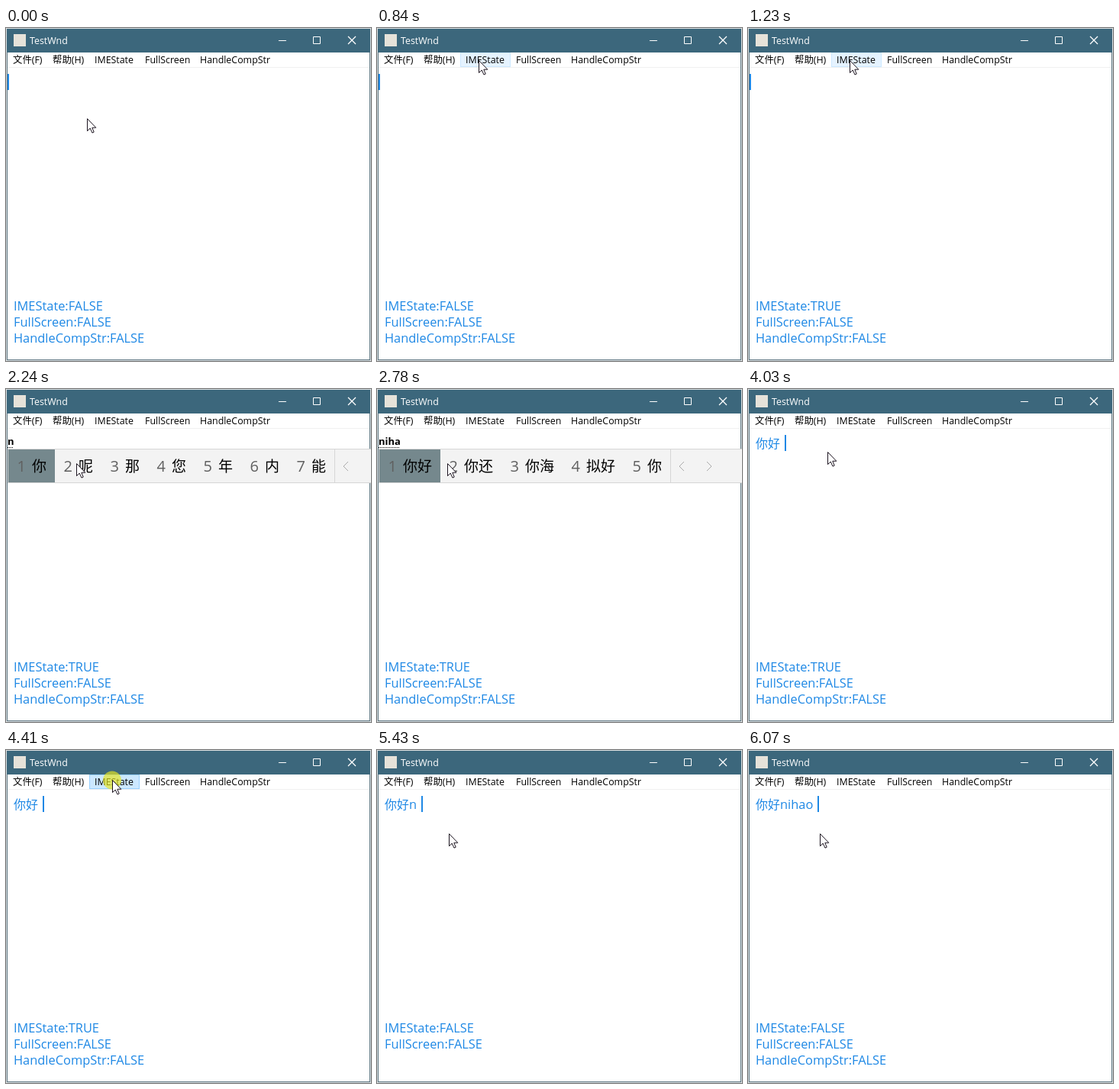
Animation, 478 px wide and 435 px high, one loop 8.01 s. Source, as an HTML page:

```html
<!DOCTYPE html>
<html lang="zh">
<head>
<meta charset="utf-8">
<title>TestWnd</title>
<style>
html, body { margin: 0; width: 100%; height: 100%; overflow: hidden; background: #fff; }
svg { display: block; }
text { font-family: "Open Sans", "Noto Sans CJK SC", "Noto Sans CJK", sans-serif; white-space: pre; }
.ui { font-size: 12.4px; }
.blue { font-size: 16.4px; fill: #1e88e5; }
.cjk { font-size: 16px; }
.comp { font-size: 13px; font-weight: 700; }
.num { font-size: 20px; fill: #606060; }
.word { font-size: 19px; }
</style>
</head>
<body>
<svg width="478" height="435" viewBox="0 0 478 435">
  <rect width="478" height="435" fill="#dcdfe0"/>
  <rect x="1.5" y="1.5" width="475" height="432" fill="#fff" stroke="#56707d"/>
  <rect x="1" y="1" width="476" height="31" fill="#3c677c"/>
  <rect x="10" y="8" width="16" height="16" fill="#e6e2d9"/>
  <text class="ui" x="31" y="21" fill="#fff">TestWnd</text>
  <path d="M357 16.5h10M402.5 11.5h9v9h-9z" fill="none" stroke="#fff"/>
  <path d="M448 11l10 10M458 11l-10 10" stroke="#fff" stroke-width="1.3"/>
  <path d="M2 51.5H476" stroke="#f0f0f0"/>
  <rect id="highlight" x="109.5" y="32.5" width="65" height="18"/>
  <g id="menu"></g>
  <g id="status"></g>
  <text class="blue" id="typed" y="77"><tspan class="cjk" x="10">你好</tspan><tspan id="latin" x="42"></tspan></text>
  <rect id="caret" y="60" width="2" height="21" fill="#1e88e5"/>
  <g id="ime">
    <text class="comp" id="comp" x="2" y="73"></text>
    <path id="dots" stroke="#000" stroke-dasharray="1 1"/>
    <rect x="2.5" y="78.5" width="500" height="44" fill="#f3f3f3" stroke="#d6d6d6"/>
    <g id="candidates"></g>
  </g>
  <circle id="click" r="12" fill="#e4e420" opacity=".68"/>
  <path id="cursor" d="M.5.5V16.5L4.2 13L7 19L9.2 18L6.8 12.2H11.8Z" fill="#fff" stroke="#1c1420"/>
</svg>
<script>
const LOOP = 8010;
const $ = id => document.getElementById(id);
const show = (id, on) => $(id).setAttribute("visibility", on ? "visible" : "hidden");
const label = (cls, x, y, s) => `<text class="${cls}" x="${x}" y="${y}">${s}</text>`;

$("menu").innerHTML = [[9, "文件(F)"], [61, "帮助(H)"], [116, "IMEState"], [182, "FullScreen"], [254, "HandleCompStr"]]
  .map(([x, s]) => label("ui", x, 46, s)).join("");
$("status").innerHTML = ["IMEState:FALSE", "FullScreen:FALSE", "HandleCompStr:FALSE"]
  .map((s, i) => label("blue", 10, 369 + 21 * i, s)).join("");
const lines = $("status").children;

// start, step length, step count, destination
const moves = [
  [440, 80, 6, 133, 42],
  [1320, 74, 4, 92, 97],
  [4030, 77, 4, 139, 39.5],
  [4650, 80, 3, 94, 109],
];
const compositions = [
  [2240, "n", "你 呢 那 您 年 内 能"],
  [2470, "ni", "你 呢 尼 泥 拟 逆 妮"],
  [2700, "nih", "你好 你会 你还 你和 你很"],
  [2780, "niha", "你好 你还 你海 拟好 你"],
  [2950, "nihao", "你好 你 呢 尼 泥 拟"],
  [3180, "", ""],
];
const typing = [[5430, "n"], [5670, "ni"], [5830, "nih"], [5910, "niha"], [6070, "nihao"]];
const advance = { n: 10, i: 4.2, h: 10, a: 9.2, o: 10 };
const between = (t, a, b) => t >= a && t < b;
const latest = (list, t) => list.filter(k => t >= k[0]).pop();

function cursorAt(t) {
  let x = 106, y = 118;
  for (const [start, step, count, toX, toY] of moves) {
    if (t < start) break;
    const p = Math.min(1, (Math.floor((t - start) / step) + 1) / count);
    x += (toX - x) * p;
    y += (toY - y) * p;
  }
  return [x, y];
}

function candidateRow(words) {
  let x = 3, out = "";
  words.split(" ").forEach((word, i) => {
    const width = 42 + 19 * word.length;
    if (!i) out += `<rect x="3" y="79" width="${width}" height="43" fill="#75888d"/>`;
    out += label("num", x + 11.5, 108, i + 1) + label("word", x + 31, 107.5, word);
    x += width;
  });
  return out + `<path d="M${x + .5} 79V122" stroke="#d6d6d6"/>
    <path d="M${x + 18} 95l-6 6 6 6M${x + 48} 95l6 6-6 6" fill="none" stroke="#aaa"/>`;
}

let shownWords = "";
function drawIme(t) {
  const [, keys, words] = latest(compositions, t) || [0, "", ""];
  show("ime", keys);
  if (keys && words !== shownWords) {
    shownWords = words;
    $("candidates").innerHTML = candidateRow(words);
  }
  $("comp").textContent = keys;
  const width = [...keys].reduce((w, c) => w + advance[c] * .82, 0);
  $("dots").setAttribute("d", `M2 76.5h${Math.round(width)}`);
  return keys;
}

function render(t) {
  const [x, y] = cursorAt(t);
  const pressed = between(t, 920, 1080) || between(t, 4340, 4490);
  $("cursor").setAttribute("transform", `translate(${Math.round(x)} ${Math.floor(y)})`);
  $("click").setAttribute("cx", x);
  $("click").setAttribute("cy", y);
  show("click", pressed);

  show("highlight", x >= 109 && x < 175 && y >= 32 && y < 51);
  $("highlight").setAttribute("fill", pressed ? "#cce8ff" : "#e5f3ff");
  $("highlight").setAttribute("stroke", pressed ? "#99d1ff" : "#cce8ff");

  lines[0].textContent = "IMEState:" + (between(t, 1080, 4490) ? "TRUE" : "FALSE");
  lines[2].setAttribute("visibility", between(t, 5430, 5510) || between(t, 5910, 5990) ? "hidden" : "visible");

  const composing = drawIme(t);
  const latin = (latest(typing, t) || [0, ""])[1];
  $("latin").textContent = latin;
  show("typed", t >= 3180);
  show("caret", !composing);
  const caretX = t < 3180 ? 2 : 48 + [...latin].reduce((w, c) => w + advance[c], 0);
  $("caret").setAttribute("x", Math.round(caretX));
}

const origin = performance.now();
function tick() {
  render((performance.now() - origin) % LOOP);
  requestAnimationFrame(tick);
}
tick();
</script>
</body>
</html>
```
